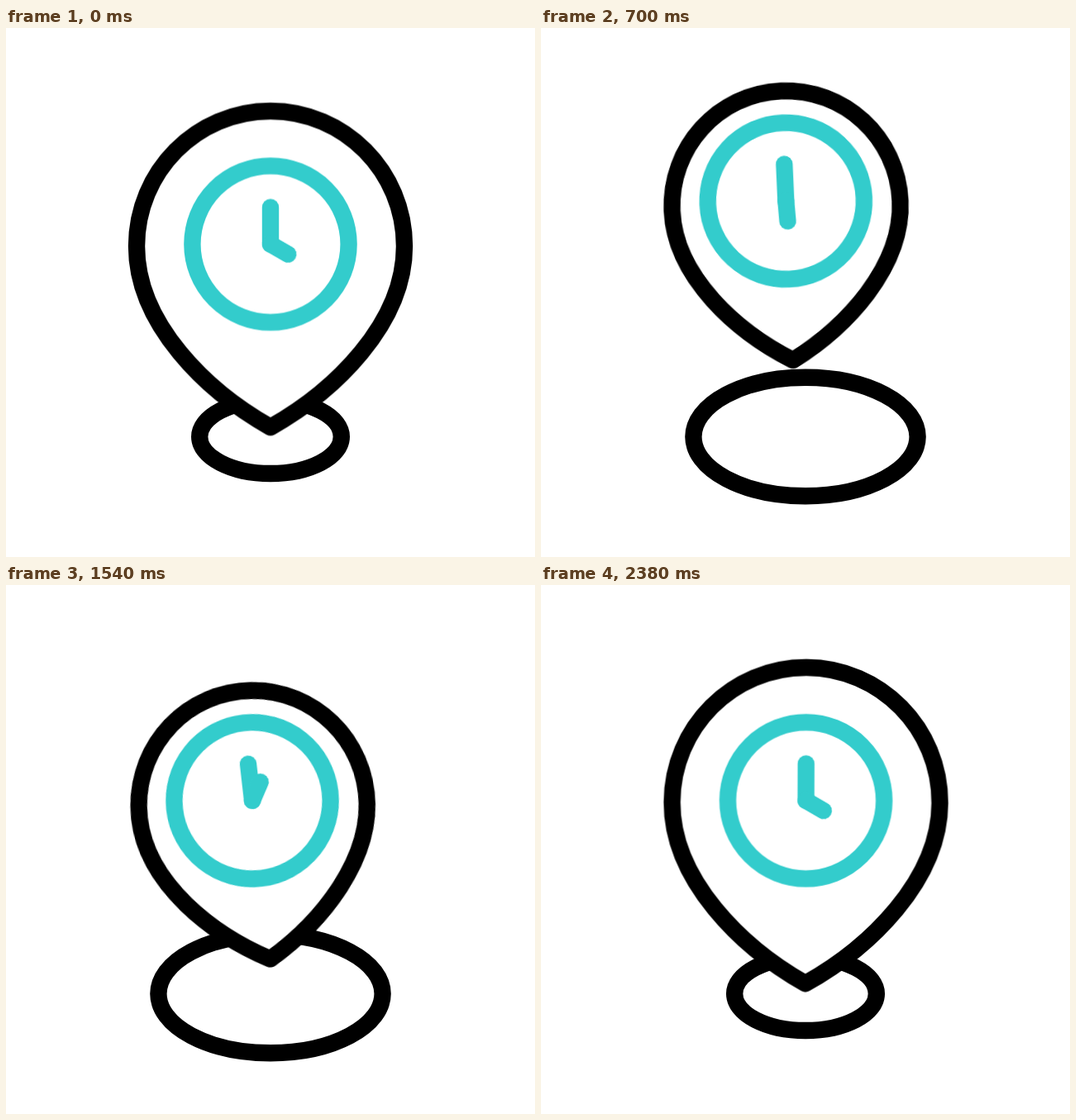
An HTML page for the animation above (2400 ms loop, 640 px wide and 640 px high).

```html
<!DOCTYPE html>
<html lang="en">
<head>
<meta charset="utf-8">
<title>Time and place pin</title>
<style>
  html, body { margin: 0; width: 100%; height: 100%; overflow: hidden; background: #fff; }
  svg { display: block; width: 100%; height: 100%; }

  .line { fill: none; stroke: #000; stroke-width: 20.4; stroke-linecap: round; stroke-linejoin: round; }
  .teal { stroke: #3cc; }
  .pin { fill: #fff; vector-effect: non-scaling-stroke; }

  .base, .hop, .sway, .lean, .pin, .hour {
    animation: 2400ms cubic-bezier(.3333, 0, .6667, 1) infinite;
  }
  .base { animation-name: base; }
  .hop  { animation-name: hop; }
  .sway { animation-name: sway; }
  .lean { animation-name: lean; transform-origin: 0 195px; }
  .pin  { animation-name: shrink; }
  .hour { animation-name: hour; }

  @keyframes base {
    0%, 3.333%, 99.583%, 100% { rx: 85.8px; ry: 44.5px; }
    25.625%, 74.79% { rx: 135.6px; ry: 71.8px; }
  }
  @keyframes shrink {
    0%, 3.333%, 99.583%, 100% { transform: translateY(0) scale(1); }
    25.625%, 74.79% { transform: translateY(4px) scale(.8525); }
  }
  @keyframes hop {
    0%, 3.333%, 100% { transform: translateY(0); }
    25% { transform: translateY(-62px); }
    41.667%, 69.167% { transform: translateY(-1.9px); }
    90.417% { transform: translateY(-39px); }
  }
  @keyframes sway {
    0%, 3.333% { transform: translateX(0); }
    15% { transform: translateX(8px); }
    28.333% { transform: translateX(-15.5px); }
    43.333% { transform: translateX(36px); }
    58.333%, 78.333% { transform: translateX(0); }
    90.833% { transform: translateX(-4px); }
    100% { transform: translateX(0); }
  }
  @keyframes lean {
    0%, 3.333% { transform: rotate(0deg); }
    19.167% { transform: rotate(-10deg); }
    34.167% { transform: rotate(0deg); }
    56.25% { transform: rotate(-9.6deg); }
    77.083% { transform: rotate(0deg); }
    78.333% { transform: rotate(0deg); }
    90.833% { transform: rotate(9deg); }
    100% { transform: rotate(0deg); }
  }
  @keyframes hour {
    0%, 8.125% { transform: rotate(120deg); }
    91.458%, 100% { transform: rotate(480deg); }
  }
</style>
</head>
<body>
<svg viewBox="0 0 640 640">
  <ellipse class="line base" cx="320" cy="494.5" rx="85.8" ry="44.5"/>
  <g transform="translate(320 261.5)">
    <g class="hop"><g class="sway"><g class="lean">
      <path class="line pin" d="M0-161C89.5-161 162-87.8 162 2.5C162 97 76.5 178.5 0 221.5C-76.5 178.5-162 97-162 2.5C-162-87.8-89.5-161 0-161Z"/>
      <circle class="line teal" r="94.6"/>
      <path class="line teal" d="M0 0V-44.5"/>
      <path class="line teal hour" d="M0 0V-24.5"/>
    </g></g></g>
  </g>
</svg>
</body>
</html>
```
